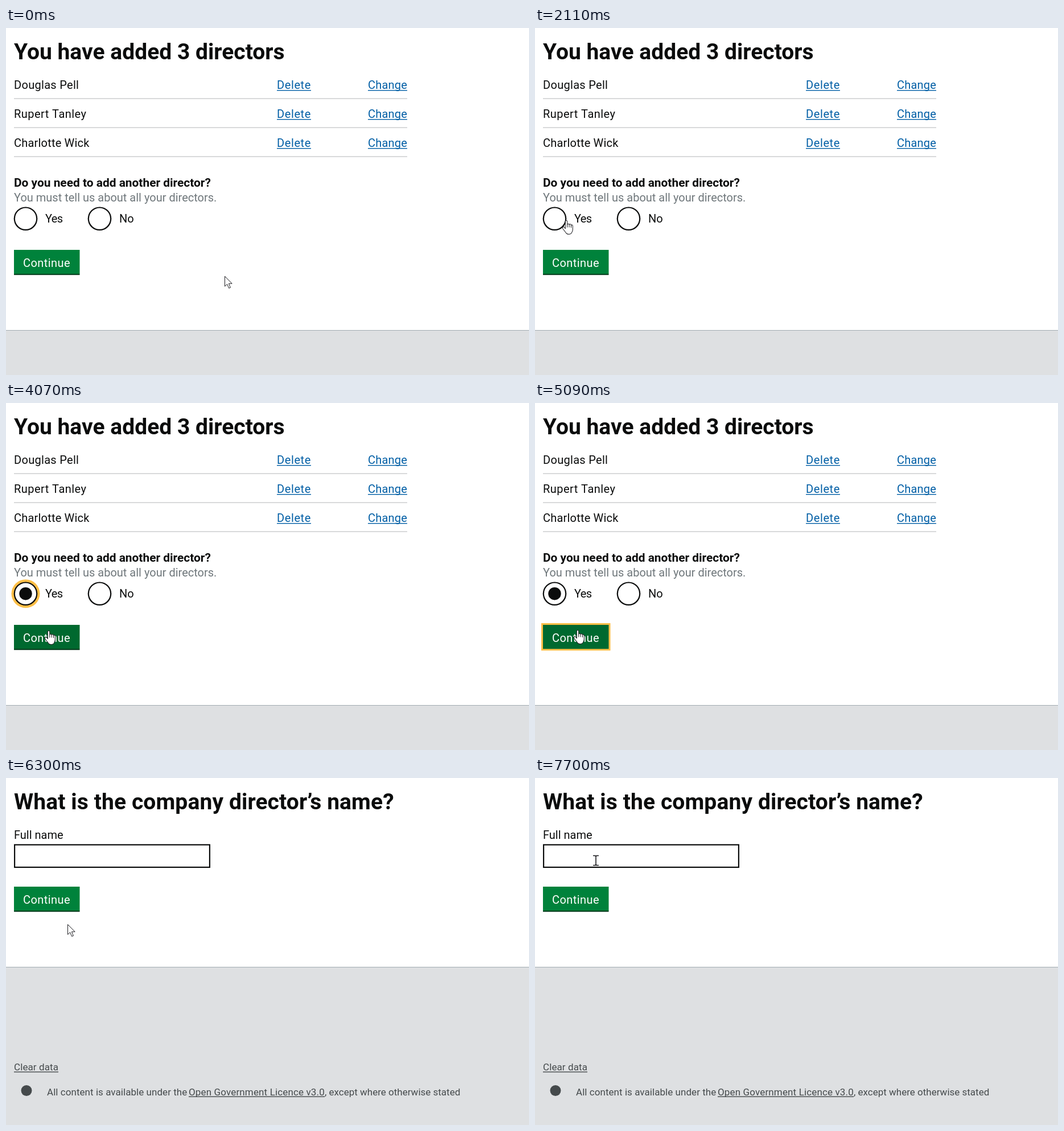
Animation, 919 px wide and 610 px high, one loop 8000 ms. Source, as an HTML page with a canvas:

```html
<!DOCTYPE html>
<html lang="en">
<head>
<meta charset="utf-8">
<title>Add another director</title>
<style>
  html, body { margin: 0; width: 100%; height: 100%; overflow: hidden; background: #fff; }
  canvas { display: block; width: 919px; height: 610px; }
</style>
</head>
<body>
<canvas id="stage"></canvas>
<script>
const W = 919, H = 610, LOOP = 8000;
const INK = '#0b0c0c', LINK = '#005ea5', HINT = '#6f777b', FOOT = '#454a4c';
const GREEN = '#00823b', HOVER = '#00692f', SHADE = '#003618', FOCUS = '#ffbf47';
const FAMILY = 'Roboto, "Open Sans", sans-serif';
const BODY = '400 20px ' + FAMILY;
const BOLD = '700 20.9px ' + FAMILY;
const HEAD = '700 39px ' + FAMILY;
const SMALL = '400 17px ' + FAMILY;

const canvas = document.getElementById('stage');
const ctx = canvas.getContext('2d');
const ratio = window.devicePixelRatio || 1;
canvas.width = W * ratio;
canvas.height = H * ratio;

// Pointer stops: time, x, y, shape
const moves = [
  [0, 384, 436, 'arrow'], [700, 225, 392, 'arrow'],
  [840, 163, 366, 'arrow'], [970, 120, 350, 'arrow'],
  [1230, 106, 350, 'hand'], [1360, 88, 350, 'hand'], [1490, 78, 347, 'hand'],
  [1600, 70, 343, 'hand'], [1700, 64, 340, 'hand'], [1810, 59, 338, 'hand'],
  [2000, 57, 338, 'hand'], [2110, 55, 338, 'hand'], [2210, 53, 338, 'hand'],
  [2310, 51, 338, 'hand'], [2420, 50, 338, 'hand'],
  [3180, 53, 348, 'hand'], [3280, 60, 367, 'arrow'], [3380, 67, 383, 'arrow'],
  [3480, 72, 393, 'hand'], [3580, 74, 398, 'hand'], [3680, 75, 400, 'hand'],
  [5090, 75, 399, 'hand'], [5240, 94, 318, 'hand'], [5370, 108, 258, 'hand'],
  [5540, 108, 257, 'hand'], [5900, 108, 257, 'arrow'],
  [7070, 108, 250, 'arrow'], [7175, 108, 231, 'hand'], [7280, 108, 210, 'hand'],
  [7385, 108, 194, 'hand'], [7490, 108, 175, 'arrow'],
  [7595, 107, 153, 'beam'], [7700, 107, 145, 'beam']
];

const arrowShape = new Path2D('M0 0V16L3.7 12.5L6.5 19L9 18L6.3 11.6H11.5Z');
const handShape = new Path2D(
  'M5 13V2Q5 .5 6.5 .5T8 2V7Q8.2 5.5 9.6 5.5T11 7Q11.3 6 12.5 6T14 7.6' +
  'Q14.4 7 15.3 7T16.5 8.7V14.5Q16.4 17 15 19Q14.2 21.7 10.5 21.7Q6.8 21.7 6 19.5' +
  'L1 13Q.2 11.3 1.4 10.4Q2.7 9.8 3.8 11.3Z');
const handCreases = new Path2D('M8 7V11M11 7V11M14 7.6V11.5');

function rect(x, y, w, h, color) {
  ctx.fillStyle = color;
  ctx.fillRect(x, y, w, h);
}

function disc(x, y, r, color) {
  ctx.fillStyle = color;
  ctx.beginPath();
  ctx.arc(x, y, r, 0, Math.PI * 2);
  ctx.fill();
}

function text(str, x, y, font = BODY, color = INK, gap = 0) {
  ctx.font = font;
  ctx.letterSpacing = gap + 'px';
  ctx.fillStyle = color;
  ctx.fillText(str, x, y);
}

function link(str, x, y, width, font, color, gap) {
  text(str, x, y, font, color, gap);
  rect(x, y + 2, width, 1.4, color);
}

function row(name, y, gap) {
  text(name, 14, y, BODY, INK, gap);
  link('Delete', 476, y, 60, BODY, LINK, 0.6);
  link('Change', 636, y, 69, BODY, LINK, 0.2);
  rect(14, y + 16.5, 691, 1.2, '#bfc1c3');
}

function radio(x, label, focused, checked) {
  const y = 335.2;
  if (focused) disc(x, y, 25, FOCUS);
  disc(x, y, 20.8, INK);
  disc(x, y, 18.6, '#fff');
  if (checked) disc(x, y, 11.2, INK);
  text(label, x + 34.5, 342, BODY, INK, label === 'Yes' ? -0.6 : 0);
}

function button(y, dark, focused, pressed) {
  if (pressed) y += 2;
  if (focused) rect(11, y - 3, 121.5, 48.2, FOCUS);
  else rect(14, y + 42, 115.5, 2.2, SHADE);
  rect(14, y, 115.5, 42.3, dark ? HOVER : GREEN);
  text('Continue', 30, y + 29.5, BODY, '#fff', 0.45);
}

function footer(y) {
  rect(0, y, W, H - y, '#dee0e2');
  rect(0, y, W, 1, '#a1acb2');
}

function listPage(t) {
  const done = t >= 4260;
  text('You have added 3 directors', 14, 55, HEAD);
  row('Douglas Pell', 107, 0.3);
  row('Rupert Tanley', 158, 0.45);
  row('Charlotte Wick', 209, 0.2);
  text('Do you need to add another director?', 14, 279, BOLD);
  text('You must tell us about all your directors.', 14, 305, BODY, HINT);
  radio(34.5, 'Yes', t >= 2820 && !done, t >= 2920);
  radio(164.5, 'No', false, false);
  button(390, t >= 3480, done, done && t < 4470);
  footer(531);
}

function namePage(t) {
  text('What is the company director’s name?', 14, 55, HEAD, INK, 0.1);
  text('Full name', 14, 107);
  rect(14, 116.3, 345, 41.7, INK);
  rect(16.2, 118.5, 340.6, 37.3, '#fff');
  button(191, t >= 7175 && t < 7490, false, false);
  footer(332);
  link('Clear data', 14, 514, 78, SMALL, FOOT, 0.1);
  disc(36, 549.5, 9.5, FOOT);
  text('All content is available under the', 72, 557.5, SMALL, FOOT, 0.05);
  link('Open Government Licence v3.0', 321, 557.5, 239, SMALL, FOOT, 0.14);
  text(', except where otherwise stated', 560, 557.5, SMALL, FOOT);
}

function outlined(path) {
  ctx.fillStyle = '#fff';
  ctx.fill(path);
  ctx.stroke(path);
}

const pointers = {
  arrow() {
    ctx.translate(0.5, 0.5);
    ctx.scale(1.1, 1.1);
    outlined(arrowShape);
  },
  hand() {
    ctx.scale(1.13, 1.13);
    ctx.translate(-6.5, 0);
    outlined(handShape);
    ctx.stroke(handCreases);
  },
  beam() {
    ctx.lineWidth = 1.6;
    ctx.stroke(new Path2D('M-5 -8.5H-1.5L0 -7.5L1.5 -8.5H5M0 -7.5V7.5M-5 8.5H-1.5L0 7.5L1.5 8.5H5'));
  }
};

function pointer(t) {
  const [, x, y, shape] = moves.findLast(m => m[0] <= t);
  ctx.save();
  ctx.translate(x, y);
  ctx.strokeStyle = '#1c1c20';
  ctx.lineWidth = 0.9;
  ctx.lineJoin = 'round';
  pointers[shape]();
  ctx.restore();
}

function draw(t) {
  ctx.setTransform(ratio, 0, 0, ratio, 0, 0);
  rect(0, 0, W, H, '#fff');
  if (t < 6300) listPage(t);
  else namePage(t);
  pointer(t);
}

const start = performance.now();
function tick() {
  draw((performance.now() - start) % LOOP);
  requestAnimationFrame(tick);
}
tick();
</script>
</body>
</html>
```
